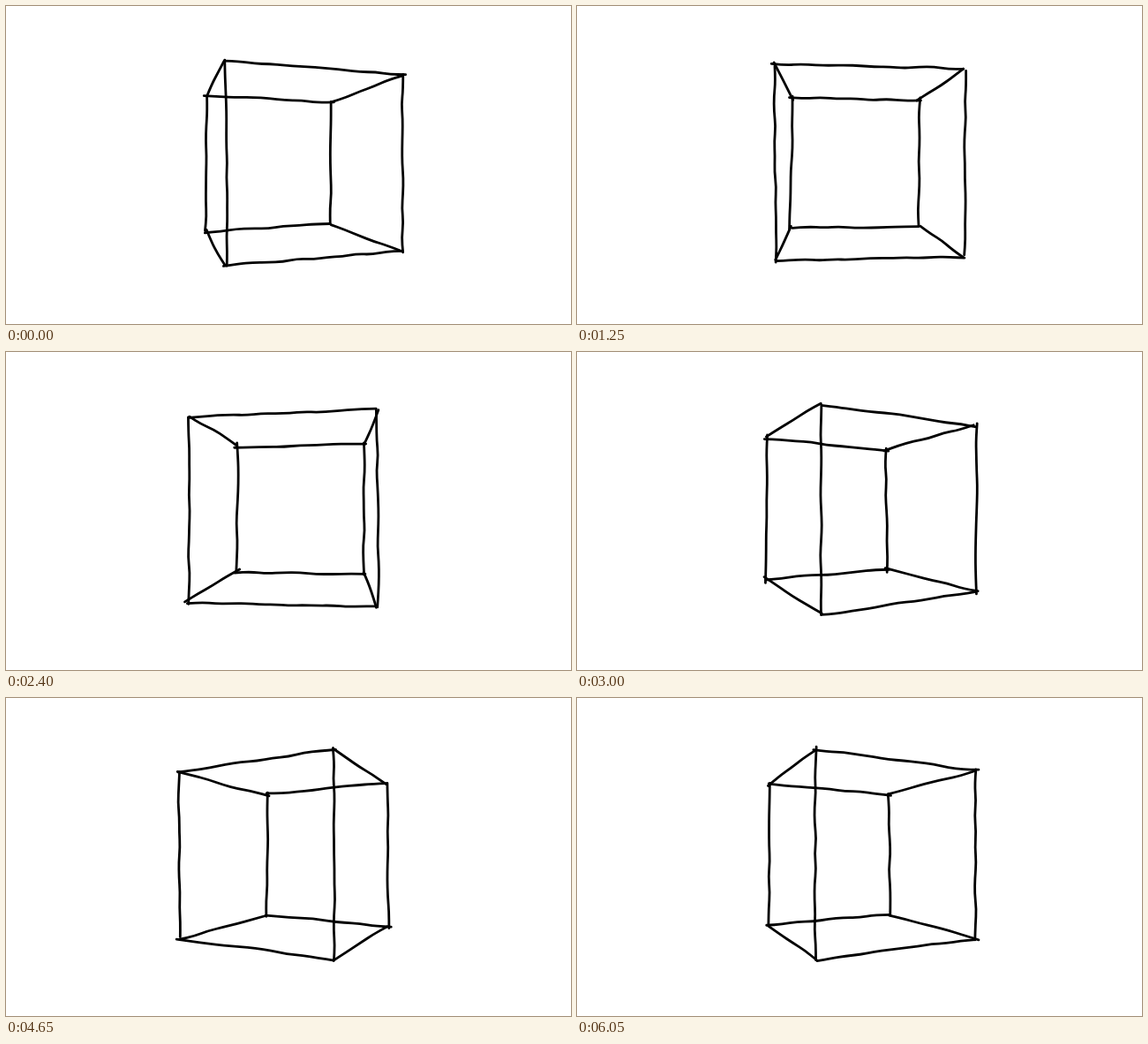
These frames come from a looping animation (640 px wide and 360 px high, 6.1 s). An HTML page with a canvas:

```html
<!DOCTYPE html>
<html lang="en">
<head>
<meta charset="utf-8">
<title>Sketched cube</title>
<style>
  html, body { margin: 0; width: 100%; height: 100%; overflow: hidden; background: #fff; }
  canvas { display: block; }
</style>
</head>
<body>
<canvas id="stage" width="640" height="360"></canvas>
<script>
const ctx = document.getElementById('stage').getContext('2d');
const STEP = 50, STEPS = 122;
const CX = 323.5, CY = 177.7, FOCAL = 434, DIST = 5, RADIUS = Math.SQRT2;

function seeded(seed) {
  let s = seed | 0;
  return () => {
    s = (s + 0x6D2B79F5) | 0;
    let t = Math.imul(s ^ (s >>> 15), 1 | s);
    t = (t + Math.imul(t ^ (t >>> 7), 61 | t)) ^ t;
    return ((t ^ (t >>> 14)) >>> 0) / 4294967296;
  };
}

// Degrees of turn: a slightly slower start, then a steady spin.
function turn(n) {
  return n < 15 ? 63 - n * 57.7 / 15 : 5.3 - (n - 15) * 473.9 / 106;
}

function project(degrees, side) {
  const a = degrees * Math.PI / 180;
  const scale = FOCAL / (DIST - RADIUS * Math.cos(a));
  return [CX + RADIUS * Math.sin(a) * scale, CY + side * scale];
}

// One hand-drawn stroke: loose ends and a gentle sideways wobble.
function stroke([x1, y1], [x2, y2], random) {
  const jitter = size => (random() * 2 - 1) * size;
  const length = Math.hypot(x2 - x1, y2 - y1);
  const ux = (x2 - x1) / length, uy = (y2 - y1) / length;
  const count = Math.max(2, Math.round(length / 17));
  const start = -1 + jitter(3), end = length + 1 + jitter(3);
  const from = jitter(1.5), to = jitter(1.5);
  const points = [];
  for (let i = 0; i <= count; i++) {
    const k = i / count;
    const along = start + (end - start) * k;
    const off = from + (to - from) * k + jitter(1.1);
    points.push([x1 + ux * along - uy * off, y1 + uy * along + ux * off]);
  }
  ctx.beginPath();
  ctx.moveTo(...points[0]);
  for (let i = 1; i < count; i++) {
    const [px, py] = points[i], [qx, qy] = points[i + 1];
    ctx.quadraticCurveTo(px, py, (px + qx) / 2, (py + qy) / 2);
  }
  ctx.lineTo(...points[count]);
  ctx.stroke();
}

function draw(n) {
  const random = seeded(n * 7919 + 17);
  const ring = side => [0, 90, 180, 270].map(d => project(turn(n) + d, side));
  const top = ring(-1), bottom = ring(1);
  ctx.fillStyle = '#fff';
  ctx.fillRect(0, 0, 640, 360);
  ctx.strokeStyle = '#000';
  ctx.lineWidth = 2.8;
  ctx.lineCap = ctx.lineJoin = 'round';
  for (let i = 0; i < 4; i++) {
    const next = (i + 1) % 4;
    stroke(top[i], top[next], random);
    stroke(bottom[i], bottom[next], random);
    stroke(top[i], bottom[i], random);
  }
}

const began = performance.now();
function tick() {
  draw(Math.floor((performance.now() - began) / STEP) % STEPS);
  requestAnimationFrame(tick);
}
tick();
</script>
</body>
</html>
```
